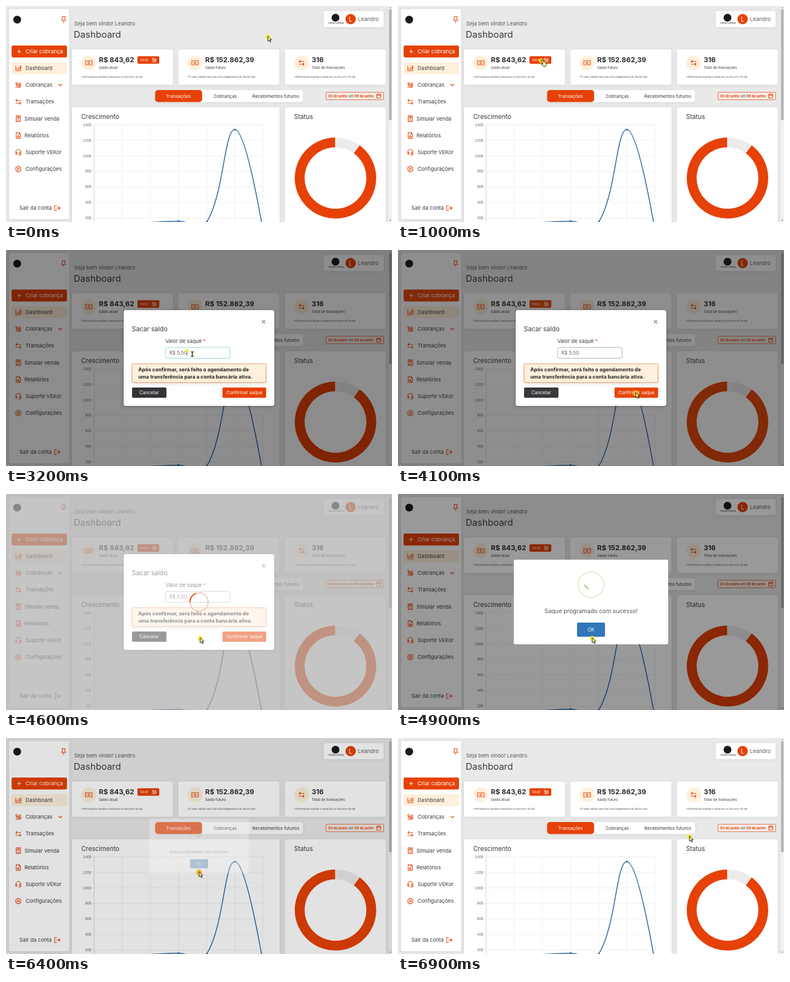
These frames come from a looping animation (690 by 388 pixels, 7 s). An HTML page:

```html
<!DOCTYPE html>
<html lang="pt-BR">
<head>
<meta charset="utf-8">
<title>Dashboard</title>
<style>
  html, body { margin: 0; width: 100%; height: 100%; overflow: hidden; background: #e9e9e9; }
  svg { display: block; font-family: Inter, "Open Sans", sans-serif; }
  text { white-space: pre; }
  .card { fill: #fff; filter: drop-shadow(0 1px 3px rgba(0, 0, 0, .07)); }
  .box { fill: #fff; filter: drop-shadow(0 1px 3px rgba(0, 0, 0, .25)); }
  .icon { fill: none; stroke-width: 1.1; stroke-linecap: round; stroke-linejoin: round; }
  .axis { font-family: "Liberation Sans", Arial, sans-serif; }
</style>
</head>
<body>
<svg id="stage" width="690" height="388" viewBox="0 0 690 388"></svg>
<script>
const ORANGE = '#e64106', CREAM = '#fef0dc', INK = '#3a3a3c', LOOP = 7000;

const rect = (x, y, w, h, r, fill, extra = '') =>
  `<rect x="${x}" y="${y}" width="${w}" height="${h}" rx="${r}" fill="${fill}" ${extra}/>`;
const card = (x, y, w, h, cls = 'card') => rect(x, y, w, h, 4, '#fff', `class="${cls}"`);
const disc = (x, y, r, fill, extra = '') => `<circle cx="${x}" cy="${y}" r="${r}" fill="${fill}" ${extra}/>`;
// y is the middle of the line
const text = (x, y, str, size, fill = INK, extra = '') =>
  `<text x="${x}" y="${y + size * .35}" font-size="${size}" fill="${fill}" ${extra}>${str}</text>`;
const mid = 'text-anchor="middle"', bold = 'font-weight="700"';
const icon = (x, y, d, color = ORANGE, scale = 1) =>
  `<path class="icon" transform="translate(${x} ${y}) scale(${scale})" d="${d}" stroke="${color}"/>`;
const ring = r => `M${-r} 0A${r} ${r} 0 1 1 ${r} 0A${r} ${r} 0 1 1 ${-r} 0`;

const I = {
  pin: 'M-3 -5H3M-2 -5V-1L-4 2H4L2 -1V-5M0 2V6',
  plus: 'M-3 0H3M0 -3V3',
  bars: 'M-4.5 -4V4.5H5M-2 2.5V0M.5 2.5V-2M3 2.5V-4M4.8 -4.5V2',
  coins: 'M-4.5 4.5L-2 1.5L1 2.5L4.5 .5M-4 .5L-1 -1L1 1M-4.5 -3A1.5 1.5 0 1 1 -1.5 -3A1.5 1.5 0 1 1 -4.5 -3M1 -2A1.6 1.6 0 1 1 4.2 -2A1.6 1.6 0 1 1 1 -2M-2 4.5H2L4.8 2',
  swap: 'M4.5 -2.5H-4.5L-2.5 -4.5M-4.5 -2.5L-2.5 -.5M-4.5 2.5H4.5L2.5 .5M4.5 2.5L2.5 4.5',
  calc: 'M-3.8 -5H3.8V5H-3.8ZM-1.8 -3H1.8V-1.2H-1.8ZM-1.8 1V1.1M0 1V1.1M1.8 1V1.1M-1.8 3V3.1M0 3V3.1M1.8 3V3.1',
  doc: 'M-3.8 -5H1.5L3.8 -2.5V5H-3.8ZM1.5 -5V-2.5H3.8M-1.5 3V1M0 3V-.5M1.5 3V1.5',
  phones: 'M-4.5 2V-.5A4.5 4.5 0 0 1 4.5 -.5V2M-4.5 0H-2.5V3.5H-4.5ZM4.5 0H2.5V3.5H4.5ZM4.5 3.5L3 5H.5',
  gear: 'M-1.2 -5H1.2L1.7 -3.5L3.5 -3.8L4.8 -1.8L3.8 0L4.8 1.8L3.5 3.8L1.7 3.5L1.2 5H-1.2L-1.7 3.5L-3.5 3.8L-4.8 1.8L-3.8 0L-4.8 -1.8L-3.5 -3.8L-1.7 -3.5Z' + ring(1.6),
  chevron: 'M-3 -1.5L0 1.5L3 -1.5',
  exit: 'M-1 -4.5H-4.5V4.5H-1M-1.5 0H5L2.5 -2.5M5 0L2.5 2.5',
  note: 'M-6 -3.8H6V3.8H-6Z' + ring(1.7) + 'M-4.2 0H-4.1M4.1 0H4.2',
  date: 'M-3.8 -3H3.8V4H-3.8ZM-3.8 -.7H3.8M-2 -4.2V-2.5M2 -4.2V-2.5'
};

function sidebar() {
  const items = [
    ['bars', 'Dashboard', 35], ['coins', 'Cobranças', 35], ['swap', 'Transações', 35],
    ['calc', 'Simular venda', 33], ['doc', 'Relatórios', 33],
    ['phones', 'Suporte VEKor', 35], ['gear', 'Configurações', 35]
  ];
  return card(5.5, 5.5, 107.5, 377.5) +
    disc(20, 24.5, 7, '#1b1b1d') + icon(103, 24, I.pin) +
    rect(10, 71, 99, 21.5, 3, ORANGE) + icon(23.5, 81.7, I.plus, '#fff') +
    text(35, 81.7, 'Criar cobrança', 9.5, '#fff') +
    rect(10, 101, 99, 21.5, 3, CREAM) +
    items.map(([k, label, x], i) => {
      const y = 111.8 + i * 30.2;
      return icon(22, y, I[k]) + text(x, y, label, 9.3);
    }).join('') +
    icon(97, 142, I.chevron) + text(24, 363, 'Sair da conta', 9.3) + icon(91.5, 363, I.exit);
}

function header() {
  return text(122, 31.5, 'Seja bem vindo! Leandro', 9.3, '#555') +
    text(121, 51, 'Dashboard', 16.4) +
    card(568, 9, 107, 29) + disc(589, 21, 7, '#1b1b1d') +
    text(589.5, 31, 'TramaContada', 4.1, '#333', mid) +
    disc(616, 23.5, 9.3, ORANGE) + text(616, 23.6, 'L', 11.5, '#fff', mid) +
    text(629, 23.5, 'Leandro', 9.6, '#5c5c5e');
}

function summary(x, kind, value, label, note) {
  return card(x, 78, 180.5, 63.5) + disc(x + 30, 102, 13.5, CREAM) + icon(x + 30, 102, I[kind]) +
    text(x + 48, 96.8, value, 12.4, '#2e2e30', bold) + text(x + 48, 110.5, label, 6.4) +
    text(x + 16.5, 127.5, note, 4.35, '#555');
}

function toolbar() {
  return card(266.5, 151, 264.5, 21.5) + rect(266.5, 151, 84, 21.5, 5, ORANGE) +
    text(308.3, 161.7, 'Transações', 8.1, '#fff', mid) +
    text(392, 161.7, 'Cobranças', 8.1, INK, mid) +
    text(482.3, 161.7, 'Recebimentos futuros', 8.1, INK, mid) +
    rect(572, 155, 103, 13.3, 1.5, '#f4eeea', `stroke="${ORANGE}" stroke-width=".8"`) +
    text(576, 161.7, `<tspan ${bold}>03 de junho</tspan><tspan fill="#555"> até </tspan><tspan ${bold}>09 de junho</tspan>`, 6, ORANGE) +
    icon(666.3, 161.5, I.date, ORANGE, .95);
}

function chart() {
  let grid = '', labels = '';
  for (let i = 0; i < 7; i++) {
    const y = 213.3 + i * 27.95, x = 157.5 + i * 50.3;
    grid += `M153 ${y}H459.5M${x} 213V388`;
    labels += text(152.5, y, 1400 - i * 200, 6.6, '#666', 'class="axis" text-anchor="end"');
  }
  const line = 'M157.5 404C175 402 190 398 208 396C230 394 244 389.5 258 388.7' +
    'C275 388 292 386.5 308.5 386.5C328 386.5 348 404 359 387.8C390 337 390 222 409 222C430 222 459.5 405 459.5 405';
  return card(118, 182, 371, 230) + text(134.5, 199, 'Crescimento', 11.4) +
    `<path d="${grid}" fill="none" stroke="#dcdcdc" stroke-width=".7" stroke-dasharray="2 1"/>` +
    `<path d="M157.5 213V388" stroke="#c8c8c8" stroke-width=".7"/>` + labels +
    `<path d="${line}" fill="none" stroke="#3069a8" stroke-width="1.6"/>` +
    [[308.5, 386.5], [359, 387.8], [409, 222]].map(p => disc(...p, 1.8, '#3069a8')).join('');
}

function status() {
  const arc = (a, b, r) => {
    const at = d => [589 + r * Math.sin(d * Math.PI / 180), 309 - r * Math.cos(d * Math.PI / 180)];
    return `M${at(a)}A${r} ${r} 0 ${b - a > 180 ? 1 : 0} 1 ${at(b)}`;
  };
  const seg = (a, b, c) => `<path d="${arc(a, b, 64)}" fill="none" stroke="${c}" stroke-width="17.6"/>`;
  return card(498.5, 182, 180.5, 230) + text(515, 199, 'Status', 11.3) +
    seg(.5, 35.5, '#ebebeb') + seg(36.3, 359.5, ORANGE);
}

function scrollbar() {
  return rect(684, 0, 6, 388, 0, '#f1f1f1') + rect(684.7, 6, 4.6, 199, 0, '#b4b4b4') +
    '<path d="M685.5 4L687 2L688.5 4ZM685.5 384L687 386L688.5 384Z" fill="#666"/>';
}

function modal() {
  return card(210.5, 108, 269, 172, 'box') +
    icon(460.5, 129, 'M-2 -2L2 2M2 -2L-2 2', '#606062', 1.2) +
    text(225, 142.3, 'Sacar saldo', 11.5) +
    text(285, 163.7, 'Valor de saque <tspan fill="#d8402a">*</tspan>', 9.2) +
    rect(285.3, 175, 115.2, 19.5, 2.5, '#fff', 'id="field" stroke-width=".9"') +
    text(292, 184.9, 'R$ 0.00', 8.6, '#606062', 'id="amount"') +
    rect(323.6, 180, .8, 10, 0, '#333', 'id="caret"') +
    rect(225.4, 204.4, 239.4, 33.6, 2.5, CREAM, 'stroke="#ee7a3a" stroke-width=".8" style="filter:drop-shadow(0 2px 3px rgba(0,0,0,.14))"') +
    text(236.5, 215.2, 'Após confirmar, será feito o agendamento de', 9, '#222', bold) +
    text(236.5, 227.7, 'uma transferência para a conta bancária ativa.', 9, '#222', bold) +
    rect(225.3, 247, 61.5, 18.5, 2, '#343338') + text(256, 256.3, 'Cancelar', 8.3, '#fff', mid) +
    rect(387, 247, 78, 18.5, 2, ORANGE) + text(426, 256.3, 'Confirmar saque', 8.2, '#fff', mid);
}

function alertBox() {
  return rect(207, 118, 276, 152, 3, '#fff') +
    disc(345, 163, 23, 'none', 'stroke="#dbf1cf" stroke-width="2"') +
    '<path id="check" d="M333.5 164L341.5 171.8L357.8 155" pathLength="1" stroke-dasharray="1 2" fill="none" stroke="#a5dc86" stroke-width="2.8" stroke-linecap="round"/>' +
    text(345, 210.3, 'Saque programado com sucesso!', 10.5, '#545454', mid) +
    rect(320, 231, 50, 25.5, 2.5, '#3076b9') + text(345, 243.8, 'OK', 8.5, '#fff', mid);
}

const pointer = (id, d, fill) => `<path id="${id}" d="${d}" fill="${fill}" stroke="#111" stroke-width=".9" stroke-linejoin="round"/>`;

stage.innerHTML =
  rect(0, 0, 690, 388, 0, '#e9e9e9') + sidebar() + header() +
  summary(118, 'note', 'R$ 843,62', 'Saldo atual', '*Informações sujeitas a variações no decorrer do dia') +
  rect(235, 90.3, 39, 13.5, 2, ORANGE) + text(239.5, 97.2, 'Sacar', 5.6, '#fff') + icon(265, 97, I.coins, '#fff', .8) +
  summary(308, 'note', 'R$ 152.862,39', 'Saldo futuro', '*O valor exibido aqui não inclui pagamentos do dia de hoje') +
  summary(498.5, 'swap', '316', 'Total de transações', '*Informações sujeitas a variações no decorrer do dia') +
  toolbar() + chart() + status() + scrollbar() +
  rect(0, 0, 690, 388, 0, '#000', 'id="dim"') +
  `<g id="modal">${modal()}</g>` +
  `<g id="loading">${rect(0, 0, 690, 388, 0, '#fff', 'opacity=".5"')}
    ${disc(345, 194, 16.3, 'none', 'stroke="#f3c3b0" stroke-width="1.7"')}
    <path id="spin" d="M328.7 194A16.3 16.3 0 0 1 339.4 178.7" fill="none" stroke="${ORANGE}" stroke-width="1.9"/></g>` +
  `<g id="alertBox">${alertBox()}</g>` +
  `<g id="cursor">${disc(0, 1.2, 4.6, '#f4ee1c', 'id="glow"')}` +
  pointer('arrow', 'M0 0V9.4L2.3 7.4L4 11L5.6 10.2L3.9 6.8H7Z', '#f6f27a') +
  pointer('hand', 'M1 0Q2 -.8 2.8 .4L4.4 3.6L5.4 3.1L6.4 3.7L7.4 3.6L8.6 4.9L9.4 8.6L7.6 11.6L4.2 11.2L.6 8L1.2 6.8L3 7.2L.6 1.6Z', '#f8f4a0') +
  '<path id="beam" d="M6.5 3H11.5M6.5 11H11.5M9 3V11" fill="none" stroke="#3a3608" stroke-width="1.6"/></g>';

const $ = id => document.getElementById(id);
const set = (id, attrs) => { for (const k in attrs) $(id).setAttribute(k, attrs[k]); };
const show = (id, on) => set(id, { opacity: +on });
const ramp = (t, a, b) => Math.min(1, Math.max(0, (t - a) / (b - a)));
const smooth = p => p * p * (3 - 2 * p);
const within = (t, ...spans) => spans.some(([a, b]) => t >= a && t < b);

const path = [
  [0, 468, 54], [1000, 256, 97], [1900, 256, 97], [2700, 324, 180], [3300, 324, 180], [3700, 425, 256],
  [4150, 425, 256], [4600, 347, 258], [4900, 347, 258], [5600, 342, 240], [6300, 342, 240], [6400, 345, 240], [6900, 521, 176]
];

function cursorAt(t) {
  const i = path.findIndex(k => k[0] > t);
  if (i < 0) return path[path.length - 1].slice(1);
  const [a, x, y] = path[i - 1], [b, u, v] = path[i], p = smooth(ramp(t, a, b));
  return [x + (u - x) * p, y + (v - y) * p];
}

function draw(t) {
  const open = 1 - (1 - ramp(t, 1600, 1900)) ** 2, started = t >= 1700, done = t >= 4700;
  const close = ramp(t, 6293, 6443);
  show('dim', 0);
  if (done) set('dim', { opacity: .4 * (1 - close) });
  else if (started) set('dim', { opacity: .45 * ramp(t, 1600, 1800) });

  set('modal', {
    opacity: started && !done ? Math.min(1, open * 1.12) : 0,
    transform: `translate(0 ${-18 * (1 - open)})`
  });
  const focus = within(t, [2700, 4100]);
  set('field', { stroke: focus ? '#7fd8cc' : '#a4a4a6' });
  show('caret', within(t, [2700, 3400], [3900, 4100]));
  $('amount').textContent = 'R$ ' + (t < 3000 ? '0.00' : t < 3100 ? '0.05' : t < 3200 ? '0.50' : '5.00');

  set('loading', { opacity: done ? 0 : smooth(ramp(t, 4050, 4450)) });
  set('spin', { transform: `rotate(${(t - 4600) * .36} 345 194)` });

  set('alertBox', {
    opacity: done ? 1 - close : 0,
    transform: `translate(345 194) scale(${1 - close / 2}) translate(-345 -194)`
  });
  const drawn = ramp(t, 4800, 5200);
  set('check', { 'stroke-dashoffset': 1 - drawn, opacity: +(drawn > 0) });

  const [x, y] = cursorAt(t);
  const hand = within(t, [1000, 1700], [3700, 4100], [5100, 6300]);
  const beam = within(t, [2700, 3400]);
  const click = within(t, [1700, 1900], [4100, 4200], [6300, 6500]);
  set('cursor', { transform: `translate(${x} ${y})` });
  set('glow', { fill: click ? '#f7b32a' : '#f4ee1c', r: click ? 5.2 : beam ? 3 : 4.4, opacity: click ? .95 : .75 });
  show('hand', hand);
  show('beam', beam);
  show('arrow', !hand && !beam);
}

function tick() {
  draw(Math.floor(performance.now() % LOOP / 100) * 100);
  requestAnimationFrame(tick);
}
tick();
</script>
</body>
</html>
```
